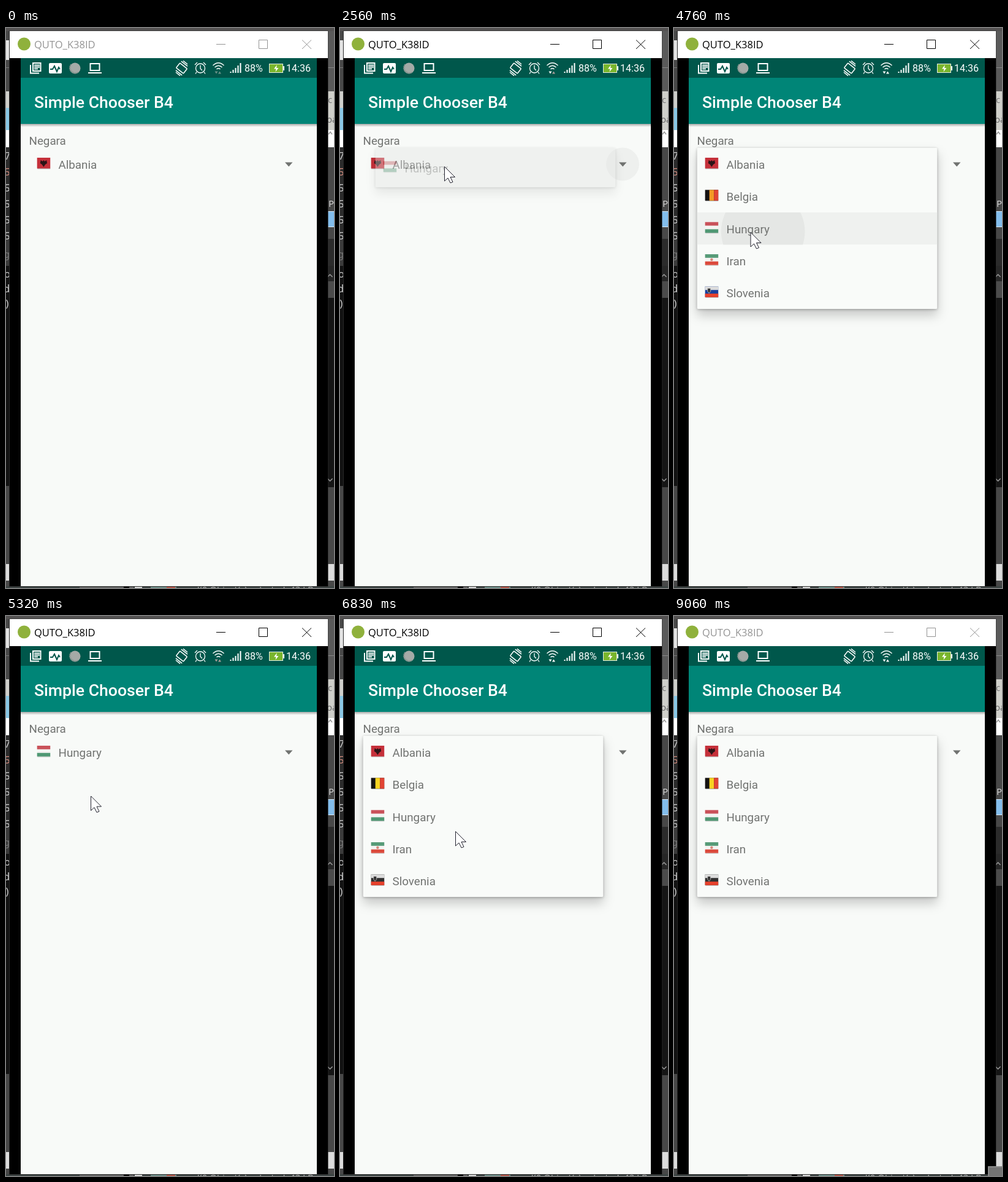
Recreate the animation shown at these times as an HTML page. Size 535 by 911 pixels, loop 9140 ms.

```html
<!DOCTYPE html>
<html lang="id">
<head>
<meta charset="utf-8">
<title>Country spinner</title>
<style>
  html, body { margin: 0; width: 100%; height: 100%; overflow: hidden; background: #444; }
  svg { display: block; width: 535px; height: 911px; }
  text { font-family: Roboto, sans-serif; white-space: pre; }
  .label { font-size: 18.8px; fill: #717371; }
  .status { font-size: 16.1px; fill: #fff; }
  .code { font: 17px "Noto Sans Mono", monospace; fill: #ccc; }
  .ui { font-family: "Open Sans", sans-serif; }
  .line { fill: none; stroke: #fff; stroke-width: 2; }
  #popup { filter: drop-shadow(0 1px 2px rgba(0,0,0,.28)) drop-shadow(0 10px 9px rgba(0,0,0,.2)); }
</style>
</head>
<body>
<svg viewBox="0 0 535 911">
  <defs>
    <linearGradient id="barShadow" x2="0" y2="1">
      <stop stop-color="#000" stop-opacity=".32"/><stop offset="1" stop-color="#000" stop-opacity="0"/>
    </linearGradient>
    <clipPath id="reveal"><rect id="revealBox" x="37.5" y="195" width="392" height="262" rx="2"/></clipPath>
    <clipPath id="rowClip"><rect x="37.5" y="300" width="392" height="52.4"/></clipPath>
  </defs>

  <g id="desktop"></g>

  <g id="window">
    <rect x="5" y="4.500" width="520.500" height="904.500" fill="#2b2b2b"/>
    <rect x="6" y="5" width="519" height="44" fill="#fff"/>
    <rect x="6" y="49" width="519" height="859"/>
    <circle cx="29.500" cy="26" r="10.500" fill="#8fb13c"/>
    <g id="caption">
      <text class="ui" x="46" y="33" font-size="16.500">QUTO_K38ID</text>
      <path d="M343 26.500h15M412.500 19.500h14v14h-14zM483 19.500l15 14.500M498 19.500l-15 14.500" fill="none" stroke="currentColor"/>
    </g>
  </g>

  <g id="phone">
    <rect x="24" y="49" width="483" height="859" fill="#f8faf8"/>
    <rect x="24" y="156" width="483" height="5" fill="url(#barShadow)"/>
    <rect x="24" y="81" width="483" height="75" fill="#008577"/>
    <rect x="24" y="49" width="483" height="32" fill="#00574b"/>
    <text x="46" y="129.500" font-size="26.600" font-weight="500" fill="#fff">Simple Chooser B4</text>

    <path class="line" d="M40 60v13.500h14M44 57h12.500v13H44zM46 60.500h9M46 63.500h9M46 66.500h6"/>
    <rect x="70" y="57" width="21" height="17" rx="2" fill="#fff"/>
    <path class="line" d="M72 67h4l3-5 4 9 3-7 2 3" style="stroke:#00574b"/>
    <circle cx="112.500" cy="65.500" r="9" fill="#a5aaa7"/>
    <path d="M106 59a9 9 0 0 0 12 13" fill="none" stroke="#7d8f89" stroke-width="2" stroke-dasharray="2 1"/>
    <path class="line" d="M137.500 58h15v11h-15zM134 73h22"/>
    <g transform="rotate(-52 286.500 65.500)" class="line" style="stroke-width:1.500">
      <rect x="281.500" y="58" width="10" height="15" rx="1"/>
      <path d="M278 60v13M295 58v13M275.500 62v9M297.500 60v9"/>
    </g>
    <g class="line" style="stroke-width:1.300">
      <circle cx="317" cy="65.500" r="7.500"/><path d="M317 60.500v5.500l3 3M308 60l4-4M326 60l-4-4M311 71.500l-2 3M323 71.500l2 3"/>
      <path d="M337.500 61q9-8.500 18 0M340.500 64q6-5.500 12 0M343.500 67q3-2.500 6 0"/>
    </g>
    <path id="upload" d="M346 74.500l2.500-4 2.500 4z"/>
    <path id="download" d="M340.500 70.500h5l-2.500 4z"/>
    <path d="M366.500 73v-2M370.500 73v-5M374.500 73v-8M378.500 73v-12M382.500 73v-16" stroke="#fff" stroke-width="2"/>
    <text class="status" x="389" y="71">88%</text>
    <rect x="429.500" y="58.500" width="22" height="14" fill="#79b52d" stroke="#e6eee4"/>
    <rect x="452" y="62" width="2" height="7" fill="#fff"/>
    <path d="M442 60l-5 6.500h3.500l-1 5 5-6.500H441z" fill="#fff"/>
    <text class="status" x="457" y="71">14:36</text>

    <text class="label" x="37.500" y="190">Negara</text>
    <circle id="press" cx="461" cy="221.500" r="27"/>
    <path d="M455 218.500h12.500l-6.250 7z" fill="#717371"/>
    <g id="choices"></g>
  </g>

  <g id="popup">
    <g clip-path="url(#reveal)">
      <g id="menu">
        <rect x="37.500" y="195" width="392" height="262" fill="#f9fbf9"/>
        <g id="rowPress" clip-path="url(#rowClip)">
          <rect x="37.500" y="300" width="392" height="52.400" fill="#eff1ef"/>
          <circle id="ripple" fill="#e5e7e5"/>
        </g>
        <g id="rows"></g>
        <rect id="shade" x="37.500" y="195" width="392" height="262"/>
      </g>
    </g>
  </g>

  <g id="corner">
    <rect x="512" y="895" width="23" height="16" fill="#8b8b8b"/>
    <rect x="514" y="897" width="21" height="14" fill="#747474"/>
  </g>
  <path id="cursor" d="M.5.5V24L6 19l4 8 4-1.500-4-8h7.500z" fill="#fff" stroke="#23232f"/>
</svg>

<script>
const LOOP = 9140;
const PITCH = 52.35;
const $ = id => document.getElementById(id);
const set = (id, attrs) => { for (const key in attrs) $(id).setAttribute(key, attrs[key]); };
const show = (id, on) => set(id, { visibility: on ? 'visible' : 'hidden' });
const clamp = v => Math.min(1, Math.max(0, v));
const span = (t, from, to) => clamp((t - from) / (to - from));
const ease = u => u * u * (3 - 2 * u);

const rect = (x, y, w, h, fill, extra = '') =>
  `<rect x="${x}" y="${y}" width="${w}" height="${h}" fill="${fill}" ${extra}/>`;
const text = (x, y, s, cls, extra = '') => `<text x="${x}" y="${y}" class="${cls}" ${extra}>${s}</text>`;

// Desktop slivers visible around the window: [top, height, colour]
const strip = (x, w, bands) => bands.map(([y, h, fill]) => rect(x, y, w, h, fill)).join('');
$('desktop').innerHTML =
  rect(0, 0, 535, 911, '#484848') + rect(0, 0, 535, 5, '#545252') +
  strip(0, 6, [
    [20, 32, '#e4e4e4'], [64, 1, '#777'], [103, 27, '#d0d0cc'], [166, 28, '#fff'],
    [194, 149, '#2b2b2b'], [343, 44, '#3b3b3b'], [387, 358, '#121212'], [872, 27, '#dcdcdc']
  ]) +
  strip(525, 10, [
    [5, 98, '#5a5a5a'], [64, 1, '#888'], [103, 63, '#cfcfca'], [166, 28, '#fff'],
    [343, 44, '#2b2b2b'], [387, 25, '#262626'], [412, 27, '#4b4b4b'], [439, 308, '#151515'],
    [872, 27, '#dcdcdc']
  ]) +
  rect(0, 130, 6, 36, '#8ac8e6') + rect(525, 298, 10, 26, '#83bdec') +
  rect(525, 298, 10, 1, '#d8eaf8') + rect(525, 323, 10, 1, '#d8eaf8') +
  ['7', '5', '5', '5', '5', '5'].map((s, i) =>
    text(-3, 214 + i * 26, s, 'code', i === 1 ? 'style="fill:#cf8a7c"' : '')).join('') +
  text(-4, 374, 'g', 'code', 'style="fill:#777"') + text(-3, 406, 'o', 'code') +
  text(-4, 430, 'd', 'code') + text(-3, 454, ')', 'code') +
  text(525, 122, 'c', 'ui', 'font-size="15" fill="#777"') +
  text(523, 154, 'oa', 'ui', 'font-size="15" fill="#666"') +
  text(526, 291, 'P', 'ui', 'font-size="15" fill="#ddd"') +
  '<path d="M526 173l3-4 3 4M524.500 405l4-4 4 4M524.500 733l4 4 4-4" fill="none" stroke="#999" stroke-width="1.500"/>' +
  rect(0, 908, 535, 3, '#3c4443') + rect(120, 908, 88, 3, '#666') + rect(192, 909, 9, 2, '#000') +
  rect(210, 908, 12, 3, '#ddd') + rect(236, 908, 42, 3, '#6f9089') + rect(262, 908, 14, 3, '#b4574a') +
  text(312, 919, "'(0 Object(s) selected, 43 kB", 'ui', 'font-size="15" fill="#bbb"');

const flagBase = fill => rect(0, 0, 21.5, 17.5, fill);
const stripes = (a, b, c) => flagBase(b) + rect(0, 0, 21.5, 5.8, a) + rect(0, 11.7, 21.5, 5.8, c);
const countries = [
  ['Albania', flagBase('#c5303a') +
    '<path d="M6 4l3 2 1.700-2 1.700 2 3-2 1 5-3 2-2.700 4-2.700-4-3-2z" fill="#2b1417"/>'],
  ['Belgia', flagBase('#151313') + rect(7, 0, 7.5, 17.5, '#f8d322', 'class="gold"') +
    rect(14.5, 0, 7, 17.5, '#e14434')],
  ['Hungary', stripes('#c9525a', '#f4f4f2', '#4f9873')],
  ['Iran', stripes('#579b78', '#f4f4f2', '#dc4a3c') + '<circle cx="10.700" cy="8.700" r="2.200" fill="#d58a7c"/>'],
  ['Slovenia', stripes('#dcdcdc', '#303030', '#e6412c').replace('fill="#303030"', 'class="navy"') +
    '<path d="M4 3h5v5l-2.500 3L4 8z" fill="#333" stroke="#ddd" stroke-width=".700"/>']
];
const entry = ([name, flag], row, id = '') =>
  `<g ${id && `id="${id}"`} transform="translate(0 ${row * PITCH})">
    <g transform="translate(50.700 211)">${rect(0.5, 17, 21, 1.5, '#bbb')}${flag}</g>
    ${text(85.5, 229, name, 'label')}</g>`;
$('rows').innerHTML = countries.map((c, i) => entry(c, i)).join('');
$('choices').innerHTML = entry(countries[0], 0, 'first') + entry(countries[2], 0, 'second');

// Pointer stops: [time, x, y]
const stops = [
  [530, 534, 907], [660, 529, 901], [800, 529, 901], [1660, 171, 228], [2290, 170, 225],
  [3480, 170, 225], [3880, 122, 345], [4020, 122, 345], [4620, 124.500, 332], [5060, 124.500, 332],
  [5320, 138, 292.500], [5870, 176, 226], [6560, 176, 226], [6830, 188, 350], [7430, 192, 382],
  [7970, 192, 382], [8590, 531, 908]
];
function pointer(t) {
  const i = Math.max(1, stops.findIndex(s => s[0] > t));
  const [t0, x0, y0] = stops[i - 1], [t1, x1, y1] = stops[i];
  const u = ease(span(t, t0, t1));
  return [x0 + (x1 - x0) * u, y0 + (y1 - y0) * u];
}

function draw(t) {
  const active = t >= 2220 && t < 8930;
  const tone = active ? '#000' : '#949494';
  set('caption', { fill: tone, color: tone });

  const again = t >= 6140;
  const start = again ? 6140 : 2560;
  const u = span(t, start, start + 270);
  const open = t >= 2560 && t < 5110 || again;
  const fade = again ? 1 : 1 - span(t, 4930, 5110);
  show('popup', open);
  if (open) {
    const k = ease(u), height = 64 + 198 * k, dx = 20 * (1 - k);
    set('popup', { opacity: Math.min(1, 0.38 + u * 1.6) * fade });
    set('revealBox', { x: 37.5 + dx, height });
    set('menu', { transform: `translate(${dx} ${(height - 262) / 2})` });
    set('shade', { opacity: 0.09 * (1 - u) });
  }
  document.querySelectorAll('.gold').forEach(e => e.setAttribute('fill', again ? '#f8d322' : '#f39a25'));
  document.querySelectorAll('.navy').forEach(e => e.setAttribute('fill', again ? '#303030' : '#183f9c'));

  const pressing = t >= 4690 && t < 5110;
  const spread = (t - 4690) / 380;
  set('rowPress', { opacity: pressing ? 1 : 0 });
  if (pressing) set('ripple', { cx: 125 + 108 * spread, cy: 332 - 6 * spread, r: 30 + 205 * spread });

  set('press', { opacity: t >= start && open ? 0.04 * (1 - u) : 0 });
  set('first', { opacity: t < 4970 ? 1 : 0 });
  set('second', { opacity: t < 4970 ? 0 : 1 });

  const blink = Math.floor(t / 660) % 3;
  set('upload', { fill: t < 1700 ? '#6b9188' : blink === 1 ? '#fff' : '#a99c98' });
  set('download', { fill: t < 1700 ? '#6b9188' : blink === 2 ? '#a99c98' : '#fff' });

  const visible = t >= 530 && t < 8590;
  show('cursor', visible);
  if (visible) set('cursor', { transform: `translate(${pointer(t).join(' ')})` });
  show('corner', t >= 8930);
}

const begin = performance.now();
function tick() {
  draw((performance.now() - begin) % LOOP);
  requestAnimationFrame(tick);
}
tick();
</script>
</body>
</html>
```
